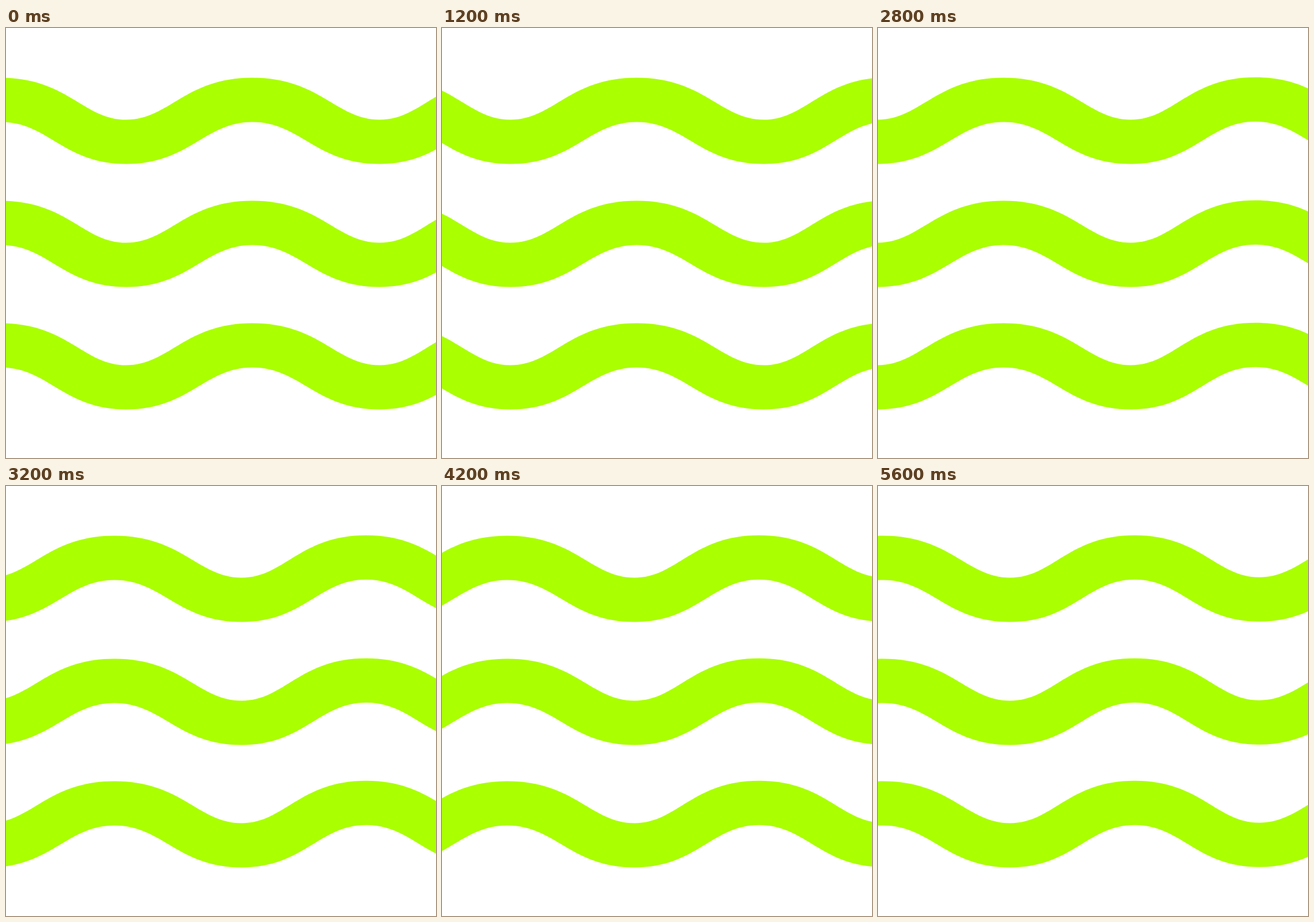
Animation of 748x748 px, one loop 5700 ms. Source, as an HTML page with a canvas:

```html
<!DOCTYPE html>
<html lang="en">
<head>
<meta charset="utf-8">
<title>Waves</title>
<style>
html, body { margin: 0; width: 100%; height: 100%; overflow: hidden; background: #fff; }
canvas { display: block; width: 748px; height: 748px; }
</style>
</head>
<body>
<canvas id="stage" width="748" height="748"></canvas>
<script>
const ctx = document.getElementById('stage').getContext('2d');
const SIZE = 748, LOOP = 5700, STEP = 100, SHIFT = 7.5;
const ROWS = [0, 214, 427];
const CREST_TOP = 86.5, CREST_BOTTOM = 163.5, DEPTH = 73;

// Alternating crests and troughs: [x, lift]
const TURNS = [[-9, 0], [209, 0], [428.5, 0], [650, 0], [866.5, 0.7], [1083, 0.7], [1303, 0.7]];

// Handle lengths as a share of the half wave
const TOP = { crest: 0.533, trough: 0.342 };
const BOTTOM = { crest: 0.378, trough: 0.501 };

function edge(path, crestY, handles, reverse) {
  const pts = TURNS.map(([x, lift], i) => ({
    x, y: crestY + (i % 2) * DEPTH - lift, h: i % 2 ? handles.trough : handles.crest
  }));
  if (reverse) pts.reverse();
  path.lineTo(pts[0].x, pts[0].y);
  for (let i = 1; i < pts.length; i++) {
    const a = pts[i - 1], b = pts[i], w = b.x - a.x;
    path.bezierCurveTo(a.x + w * a.h, a.y, b.x - w * b.h, b.y, b.x, b.y);
  }
}

const band = new Path2D();
edge(band, CREST_TOP, TOP, false);
edge(band, CREST_BOTTOM, BOTTOM, true);
band.closePath();

function draw(now) {
  const step = Math.floor((now % LOOP) / STEP);
  ctx.fillStyle = '#fff';
  ctx.fillRect(0, 0, SIZE, SIZE);
  ctx.fillStyle = '#aaff00';
  for (const y of ROWS) {
    ctx.save();
    ctx.translate(-step * SHIFT, y);
    ctx.fill(band);
    ctx.restore();
  }
}

const start = performance.now();
function tick() {
  draw(performance.now() - start);
  requestAnimationFrame(tick);
}
tick();
</script>
</body>
</html>
```
